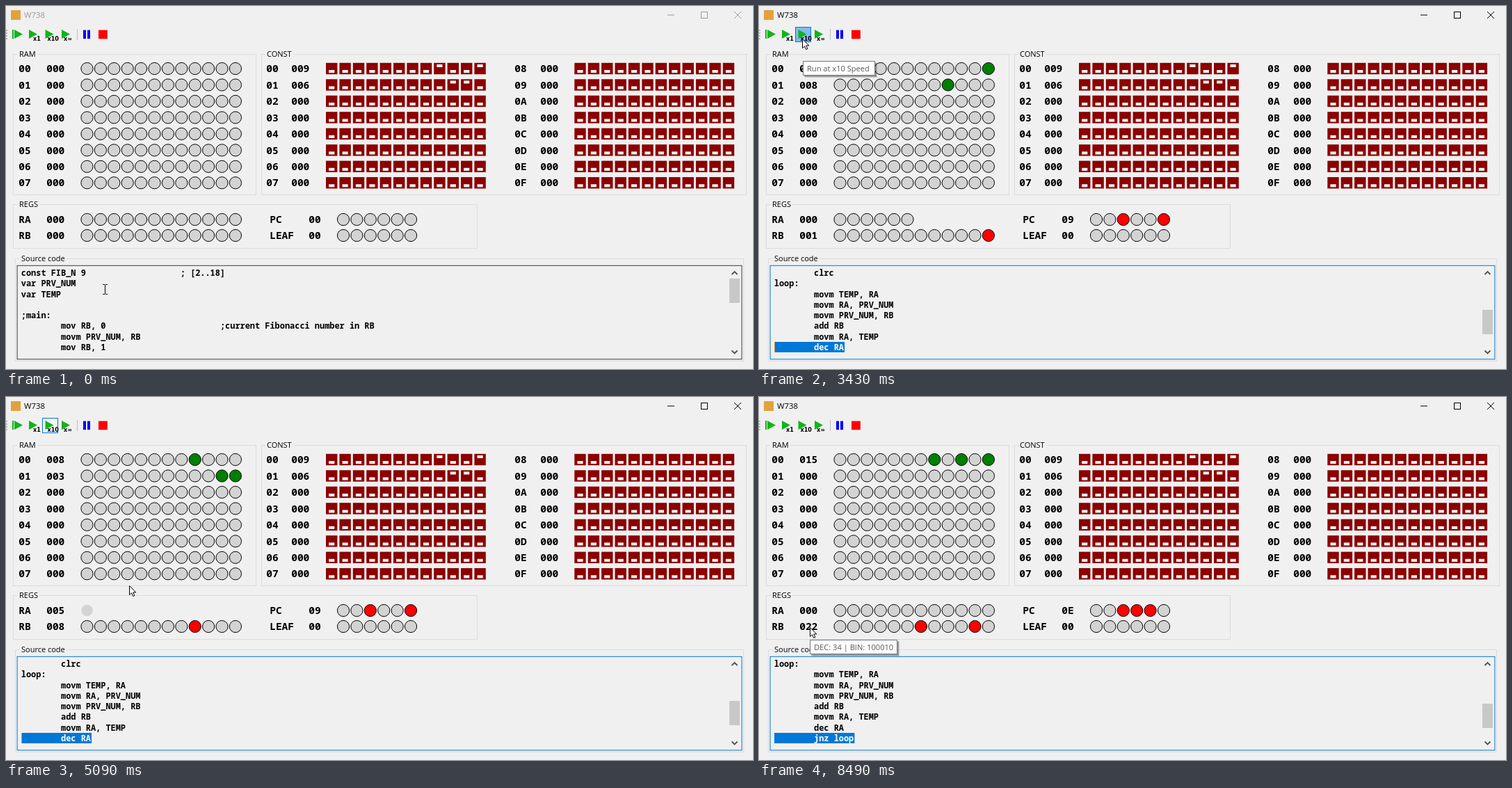
Animation of 1074x522 px, one loop 8940 ms. Source, as an HTML page with a canvas:

```html
<!DOCTYPE html>
<html lang="en">
<head>
<meta charset="utf-8">
<title>Simulator</title>
<style>
html, body { margin: 0; width: 100%; height: 100%; overflow: hidden; background: #f0f0f0; }
canvas { display: block; }
</style>
</head>
<body>
<canvas id="stage" width="1074" height="522"></canvas>
<script>
const ctx = document.getElementById('stage').getContext('2d');
const LOOP = 8940;
const UI = '"Open Sans", "Noto Sans", sans-serif';
const MONO = '"Noto Sans Mono", "DejaVu Sans Mono", monospace';
const BLUE = '#0078d7', FACE = '#f0f0f0', GREEN = '#008000', RED = '#ff0000';
const CHAR_W = 7.16, LINE_H = 15.29, PITCH = 19.4;

const tab = '        ';
const code = [
  'const FIB_N 9'.padEnd(32) + '; [2..18]',
  'var PRV_NUM', 'var TEMP', '', ';main:',
  (tab + 'mov RB, 0').padEnd(40) + ';current Fibonacci number in RB',
  ...['movm PRV_NUM, RB', 'mov RB, 1', 'mov RA, FIB_N', 'dec RA'].map(s => tab + s),
  '', tab + 'clrc', 'loop:',
  ...['movm TEMP, RA', 'movm RA, PRV_NUM', 'movm PRV_NUM, RB', 'add RB',
    'movm RA, TEMP', 'dec RA', 'jnz loop'].map(s => tab + s)
];

// Screen refreshes: runs of evenly spaced ticks [first, last, count]
const ticks = [0];
for (const [a, b, n] of [[190, 990, 8], [1090, 1310, 3], [1530, 1530, 1], [1750, 2530, 8],
  [2650, 3530, 9], [3650, 4440, 8], [4550, 5410, 9], [5530, 5980, 5],
  [6300, 6420, 2], [6640, 7410, 8], [7960, 7960, 1], [8490, 8490, 1]])
  for (let i = 0; i < n; i++)
    ticks.push(Math.floor((a + (n > 1 ? (b - a) * i / (n - 1) : 0)) / 10) * 10);
const RUN_TICK = ticks.indexOf(2870);

// Pointer path: [time, x, y]
const path = [[0, 142, 407], [100, 142, 407], [850, 102, 386], [990, 106, 386], [1310, 119, 386],
  [1530, 123, 386], [1650, 123, 386], [1970, 132, 325], [2530, 67, 53], [2650, 62, 47],
  [3430, 62, 47], [3530, 85, 85], [4100, 177, 271], [6190, 177, 271], [6300, 163, 274],
  [6420, 140, 280], [6640, 110, 287], [7300, 73, 331], [LOOP, 73, 331]];

function pointer(t) {
  const i = path.findIndex(p => p[0] > t);
  const [t0, x0, y0] = path[i - 1], [t1, x1, y1] = path[i];
  const k = (t - t0) / (t1 - t0);
  return [x0 + (x1 - x0) * k, y0 + (y1 - y0) * k];
}

function fib(n) {
  let a = 0, b = 1;
  while (n--) [a, b] = [b, a + b];
  return a;
}

// Machine state after n refreshes of the run
function machine(n) {
  const s = { prv: 0, temp: 0, tempText: 0, ra: 0, rb: 0, pc: 0, line: -1, scroll: 0, drawn: 12 };
  if (n < 0) return s;
  if (n < 3) {
    s.pc = 2 * n + 1;
    s.line = [6, 8, 11][n];
    s.rb = n ? 1 : 0;
    s.ra = n === 2 ? 8 : 0;
  } else if (n < 27) {
    const i = Math.floor((n - 3) / 3), phase = n % 3;
    s.temp = 8 - i;
    s.rb = fib(i + 1);
    s.line = 14 + 2 * phase;
    if (phase === 0) {
      Object.assign(s, { prv: fib(i), ra: s.temp, pc: 7, bareTemp: true });
    } else {
      Object.assign(s, { prv: s.rb, ra: fib(i), pc: 9, tempText: s.temp });
      if (phase === 2) { s.drawn = Math.max(0, 6 - i); s.bareRa = i > 0; }
    }
  } else {
    Object.assign(s, { prv: fib(8), rb: fib(9), pc: 14, line: 19 });
  }
  s.scroll = n >= 27 ? 12 : n >= 5 ? 11 : Math.max(0, s.line - 7);
  return s;
}

const hex = (v, n) => v.toString(16).toUpperCase().padStart(n, '0');

function rect(x, y, w, h, color) {
  ctx.fillStyle = color;
  ctx.fillRect(x, y, w, h);
}

function frame(x, y, w, h, color) {
  ctx.strokeStyle = color;
  ctx.lineWidth = 1;
  ctx.strokeRect(x + .5, y + .5, w - 1, h - 1);
}

function text(s, x, y, font, color = '#000') {
  ctx.font = font;
  ctx.fillStyle = color;
  ctx.fillText(s, x, y);
}

function poly(points, fill, stroke, close = true) {
  ctx.beginPath();
  points.forEach(([x, y]) => ctx.lineTo(x, y));
  if (close) ctx.closePath();
  if (fill) { ctx.fillStyle = fill; ctx.fill(); }
  if (stroke) { ctx.strokeStyle = stroke; ctx.stroke(); }
}

const label = (s, x, y) => text(s, x - .8, y + 5.2, 'bold 14.5px ' + MONO);

function group(name, x, y, w, h, tx) {
  frame(x, y, w, h, '#dcdcdc');
  ctx.font = '11px ' + UI;
  rect(tx - 2, y - 6, ctx.measureText(name).width + 4, 12, FACE);
  text(name, tx, y + 4.4, ctx.font);
}

function leds(x, y, count, value, color, drawn = count, bareLast = false) {
  for (let i = 0; i < drawn; i++) {
    const bare = bareLast && i === drawn - 1;
    ctx.beginPath();
    ctx.arc(x + i * PITCH, y, bare ? 8.2 : 8.6, 0, 7);
    ctx.fillStyle = value >> (count - 1 - i) & 1 ? color : '#d3d3d3';
    ctx.fill();
    if (bare) continue;
    ctx.strokeStyle = '#000';
    ctx.lineWidth = 1;
    ctx.stroke();
  }
}

function switches(x, y, value) {
  for (let i = 0; i < 12; i++) {
    const sx = x + i * PITCH, on = value >> (11 - i) & 1;
    rect(sx, y - 8.2, 16.4, 16.4, '#8b0000');
    rect(sx + 4.1, y + (on ? -6.1 : 2), 8.2, 4.1, '#f4f0f0');
  }
}

function titleBar(active) {
  const ink = active ? '#000' : '#999';
  rect(7, 6, 14, 14, '#e3a13c');
  text('W738', 26, 17, '11.4px ' + UI, ink);
  rect(951, 12.5, 10, 1, ink);
  frame(999, 8, 10, 10, ink);
  poly([[1047, 8], [1057, 18]], null, ink, false);
  poly([[1057, 8], [1047, 18]], null, ink, false);
}

function toolBar(mode) {
  for (let y = 34; y < 48; y += 4) rect(0, y, 2, 2, '#b8b8b8');
  if (mode) {
    const fill = { hover: '#b3d7f3', pressed: '#80bcf0', checked: '#f4f6f8' }[mode];
    rect(52, 30, 23, 22, fill);
    frame(52, 30, 23, 22, BLUE);
  }
  const play = x => poly([[x, 34], [x + 12, 40.5], [x, 47]], '#0fb51a');
  rect(9, 34, 2, 13, '#0fb51a');
  play(12);
  ['x1', 'x10', 'x∞'].forEach((s, i) => {
    const x = 33 + i * 23.5;
    play(x);
    text(s, x + (i ? 3 : 6), 49.5, 'bold 8px "DejaVu Sans", sans-serif');
  });
  rect(102, 33, 1, 16, '#bdbdbd');
  rect(111, 34.6, 4, 12.5, '#0000ff');
  rect(117, 34.6, 4, 12.5, '#0000ff');
  rect(133, 34.6, 12.8, 12.6, '#ff0000');
}

function panels(s) {
  group('RAM', 10, 69, 350, 203, 19);
  group('CONST', 367, 69, 698, 203, 375);
  group('REGS', 10, 285, 668, 64, 19);
  for (let r = 0; r < 8; r++) {
    const y = 90 + r * 23.47;
    const c = [9, 6][r] || 0;
    label(hex(r, 2), 19, y);
    label(hex([s.prv, s.tempText][r] || 0, 3), 59, y);
    leds(116.5, y, 12, [s.prv, s.temp][r] || 0, GREEN, 12, r === 1 && s.bareTemp);
    label(hex(r, 2), 375, y);
    label(hex(c, 3), 411, y);
    switches(460, y, c);
    label(hex(r + 8, 2), 732, y);
    label('000', 769, y);
    switches(817.3, y, 0);
  }
  label('RA', 19, 307);
  label(hex(s.ra, 3), 59, 307);
  leds(116.5, 307, 12, s.ra, RED, s.drawn, s.bareRa);
  label('RB', 19, 330);
  label(hex(s.rb, 3), 59, 330);
  leds(116.5, 330, 12, s.rb, RED);
  label('PC', 380, 307);
  label(hex(s.pc, 2), 436, 307);
  leds(485, 307, 6, s.pc, RED);
  label('LEAF', 380, 330);
  label('00', 436, 330);
  leds(485, 330, 6, 0, RED);
}

function chevron(y, dir) {
  ctx.lineWidth = 1.8;
  poly([[1043.5, y + 2 * dir], [1047.5, y - 2 * dir], [1051.5, y + 2 * dir]], null, '#505050', false);
  ctx.lineWidth = 1;
}

function editor(s, t, active) {
  group('Source code', 13, 363, 1048, 148, 22);
  frame(15.6, 372.8, 1042.8, 135.6, active ? BLUE : '#3c3c3c');
  const font = `bold ${CHAR_W / .6}px ${MONO}`;
  for (let i = 0; i < 8; i++) {
    const n = s.scroll + i, line = code[n];
    if (line === undefined) break;
    const y = 376.2 + i * LINE_H, base = y + 11.8;
    let from = 0, to = 0;
    if (n === s.line) to = line.length;
    else if (s.line < 0 && n === 0 && t >= 980) { from = 11; to = t >= 1090 ? 13 : 12; }
    text(line, 21.8, base, font);
    if (!to) continue;
    const x = 22 + from * CHAR_W, w = (to - from) * CHAR_W + .8;
    rect(x, Math.round(y), w, 15, BLUE);
    text(line.slice(from, to), x - .2, base, font, '#fff');
    const caretOn = t < 6300 || Math.floor((t - 6370) / 530) % 2 === 1;
    if (n === s.line && caretOn) rect(22, Math.round(y), 1, 15, '#ff8728');
  }
  chevron(384, 1);
  chevron(497.5, -1);
  rect(1040, Math.round(392 + s.scroll * 4.09), 15, 35, '#c8c8c8');
}

function tooltip(s, x, y, w) {
  rect(x + 3, y + 3, w, 21, 'rgba(0,0,0,.14)');
  rect(x + 2, y + 2, w, 21, 'rgba(0,0,0,.25)');
  rect(x, y, w, 21, '#fff');
  frame(x, y, w, 21, '#767676');
  text(s, x + 6, y + 15, '11.1px ' + UI, '#575757');
}

function cursor(px, py) {
  const x = Math.round(px), y = Math.round(py);
  ctx.lineWidth = 1;
  if (y > 373) {
    rect(x, y - 6, 1, 13, '#000');
    for (const dy of [-7, 7]) {
      rect(x - 3, y + dy, 3, 1, '#000');
      rect(x + 1, y + dy, 3, 1, '#000');
    }
    return;
  }
  const shape = [[0, 0], [0, 13], [3, 10.3], [5.2, 15], [7.4, 14], [5.2, 9.5], [9.3, 9.5]];
  poly(shape.map(([a, b]) => [x + .5 + a, y + .5 + b]), '#fff', '#000');
}

function draw(now) {
  const time = now % LOOP;
  let k = ticks.length - 1;
  while (ticks[k] > time) k--;
  const t = ticks[k], n = k - RUN_TICK;
  const s = machine(n), active = t >= 750;

  let mode = '';
  if (t >= 2650 && n < 0) mode = 'hover';
  else if (n >= 0 && n < 6) mode = 'pressed';
  else if (n >= 6 && n < 28) mode = 'checked';

  rect(0, 0, 1074, 522, FACE);
  ctx.lineWidth = 1;
  titleBar(active);
  toolBar(mode);
  panels(s);
  editor(s, t, active);
  if (n >= 3 && n < 6) tooltip('Run at x10 Speed', 63, 79, 104);
  if (t >= 7410) tooltip('DEC: 34 | BIN: 100010', 73, 349, 126);
  cursor(...pointer(t));
}

const start = performance.now();
function tick() {
  draw(performance.now() - start);
  requestAnimationFrame(tick);
}
tick();
</script>
</body>
</html>
```
